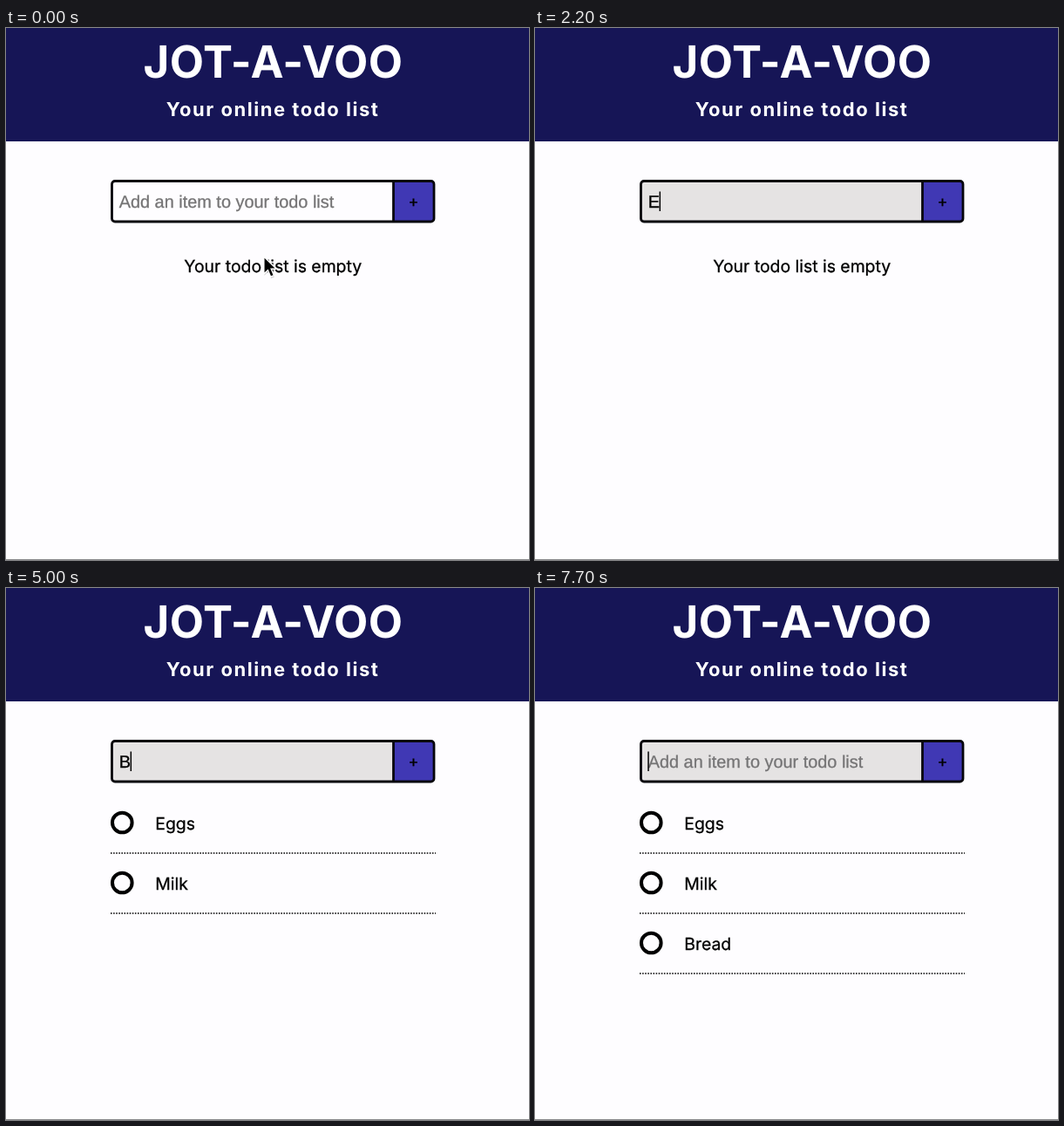
Animation of 600x610 px, one loop 8000 ms. Source, as an HTML page:

```html
<!DOCTYPE html>
<html lang="en">
<head>
<meta charset="utf-8">
<title>Todo list</title>
<style>
  html, body { margin: 0; width: 100%; height: 100%; overflow: hidden; background: #fefdff; }
  svg { display: block; width: 600px; height: 610px; }
  text {
    font-family: Inter, sans-serif; font-size: 19.4px;
    fill: currentColor; stroke: currentColor; stroke-width: .3px;
    text-rendering: geometricPrecision; white-space: pre;
  }
  .center { text-anchor: middle; }
  .title, .tagline { font-weight: 700; color: #fff; stroke: none; }
  .title { font-size: 51px; letter-spacing: .5px; }
  .tagline { font-size: 22px; letter-spacing: 1.53px; }
  .field { font-family: "Liberation Sans", Arial, sans-serif; font-size: 19.9px; }
  .plus { font-size: 18px; }
  .ring { fill: none; stroke: #000; stroke-width: 4; }
  .rule { stroke: #000; stroke-width: 1.6; stroke-dasharray: 1.6 1.5; }
  .frame { fill: none; stroke: #07060c; stroke-width: 2.8; }
  .beam { fill: none; stroke: #000; stroke-width: 1.5; }
  .halo { stroke: #fff; stroke-width: 3.6; }
</style>
</head>
<body>
<svg viewBox="0 0 600 610">
  <defs>
    <path id="beamShape" d="M-4-10.5Q0-10.5 0-7.5Q0-10.5 4-10.5M0-7.5V7.5M-4 10.5Q0 10.5 0 7.5Q0 10.5 4 10.5M-2.5 3H2.5"/>
    <path id="arrowShape" d="M0 0V20L4.6 15.8L7.8 23.3L11.6 21.7L8.5 14.3H14.5z"/>
  </defs>

  <rect width="600" height="130" fill="#161556"/>
  <rect y="609" width="600" height="1" fill="#8b8b8d"/>
  <text class="title center" x="306.5" y="57">JOT-A-VOO</text>
  <text class="tagline center" x="306.1" y="101">Your online todo list</text>

  <rect id="box" x="121.5" y="175.5" width="323" height="46.5" rx="3.5"/>
  <path d="M444.5 175.5H487.5a3.5 3.5 0 0 1 3.5 3.5V218.5a3.5 3.5 0 0 1-3.5 3.5H444.5z" fill="#4038b4"/>
  <rect class="frame" x="121.5" y="175.5" width="369.5" height="46.5" rx="3.5"/>
  <path class="frame" d="M444.5 175V222"/>
  <text class="plus center" x="467.5" y="204.9">+</text>

  <text id="entry" class="field" x="129.7" y="206"></text>
  <rect id="caret" y="187.5" width="1.5" height="22.5"/>

  <text id="empty" class="center" x="306.2" y="280">Your todo list is empty</text>
  <g id="list"></g>

  <g id="arrow">
    <use href="#arrowShape" opacity=".18" transform="translate(.5 1.8)"/>
    <use href="#arrowShape" stroke="#fff" stroke-width="1.5"/>
  </g>
  <g id="beam" transform="translate(284.5 201.3)">
    <use href="#beamShape" class="beam halo"/>
    <use href="#beamShape" class="beam"/>
  </g>
</svg>
<script>
const LOOP = 8000, STEP = 100, BLINK = 500;
const HOVER = 1000, FOCUS = 1300, FIRST_KEY = 2000;
const items = [["Eggs", 3500], ["Milk", 4600], ["Bread", 6700]];
// Each edit restarts the caret blink.
const edits = [
  [FOCUS, ""], [FIRST_KEY, "E"], [2400, "Eg"], [2600, "Eggs"], [3500, ""],
  [3700, "M"], [3900, "Mi"], [4000, "Mil"], [4200, "Milk"], [4600, ""],
  [5000, "B"], [5400, "Bre"], [5600, "Brea"], [5800, "Bread"], [6700, ""]
];

const el = id => document.getElementById(id);
const show = (node, on) => node.setAttribute("visibility", on ? "visible" : "hidden");
const box = el("box"), entry = el("entry"), caret = el("caret"), arrow = el("arrow");

el("list").innerHTML = items.map(([name], i) => `
  <g transform="translate(0 ${i * 69})">
    <circle class="ring" cx="133.3" cy="269" r="11.3"/>
    <text x="171.3" y="277.2">${name}</text>
    <path class="rule" d="M120 304H493"/>
  </g>`).join("");
const rows = [...el("list").children];

function draw(t) {
  const edit = edits.findLast(([at]) => at <= t);
  const typed = edit ? edit[1] : "";

  box.setAttribute("fill", t < HOVER ? "#fefdff" : "#e5e3e3");
  entry.textContent = typed || "Add an item to your todo list";
  entry.style.color = typed ? "#000" : "#757475";
  caret.setAttribute("x", 129.3 + (typed ? entry.getComputedTextLength() : 0));
  show(caret, edit && Math.floor((t - edit[0]) / BLINK) % 2 === 0);

  show(el("empty"), t < items[0][1]);
  rows.forEach((row, i) => show(row, t >= items[i][1]));

  const p = Math.min(t / 900, 1), glide = p * p * (3 - 2 * p);
  arrow.setAttribute("transform", `translate(${295.8 - 8 * glide} ${262 - 34 * glide})`);
  show(arrow, t < HOVER);
  show(el("beam"), t >= HOVER && t < FIRST_KEY);
}

let start;
function tick(now) {
  start ??= now;
  const t = (now - start) % LOOP;
  draw(Math.floor(t / STEP) * STEP);
  requestAnimationFrame(tick);
}
draw(0);
requestAnimationFrame(tick);
</script>
</body>
</html>
```
